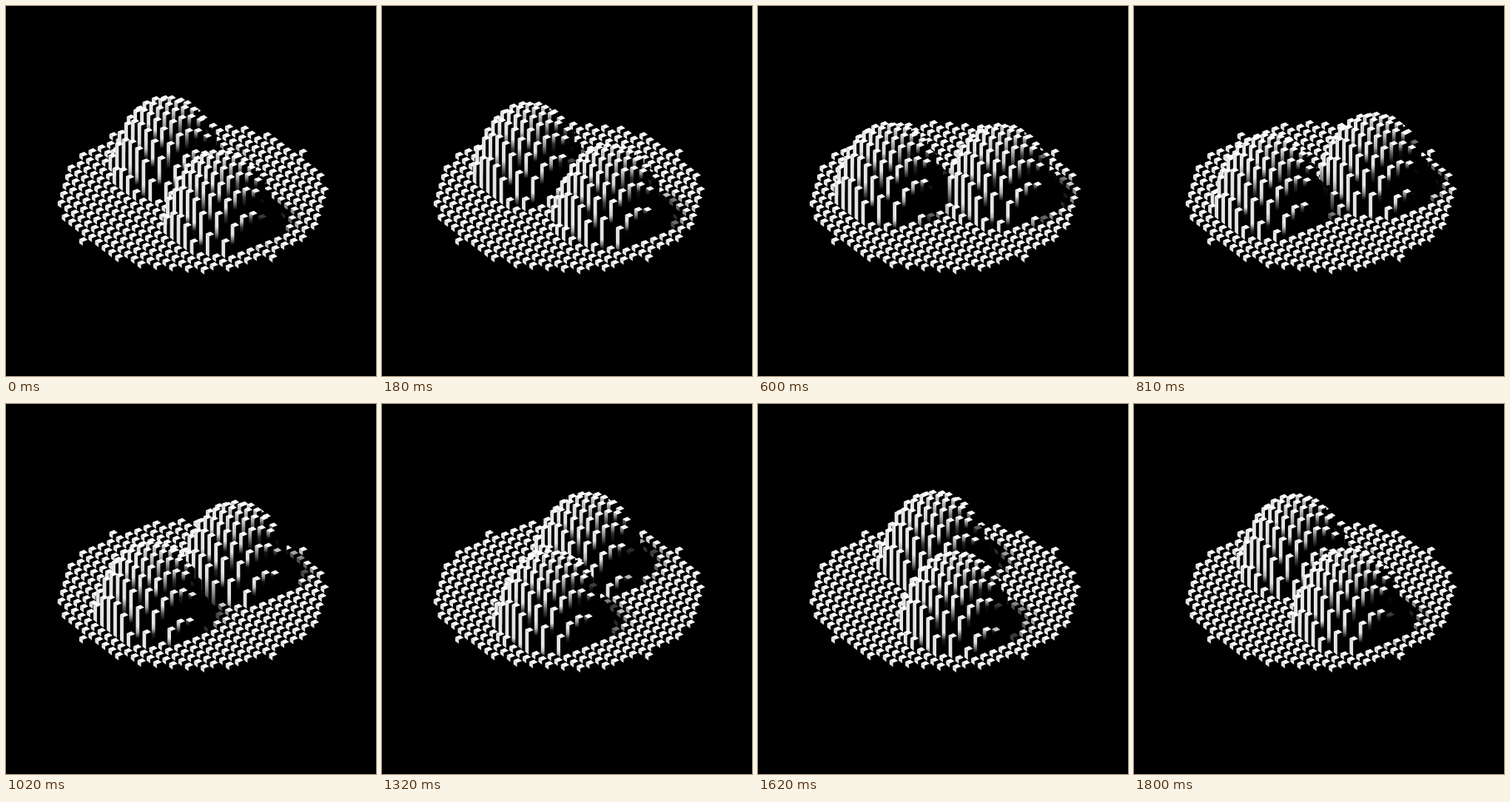
Recreate the animation shown at these times as an HTML page with a canvas. Size 500 by 500 pixels, loop 1.83 s.

```html
<!DOCTYPE html>
<html lang="en">
<head>
<meta charset="utf-8">
<title>Orbiting domes</title>
<style>
  html, body { margin: 0; width: 100%; height: 100%; overflow: hidden; background: #000; }
  canvas { display: block; width: 500px; height: 500px; }
</style>
</head>
<body>
<canvas id="stage" width="500" height="500"></canvas>
<script>
const ctx = document.getElementById('stage').getContext('2d');

// Grid units unless noted otherwise
const UNIT = 15.3, TILT = 0.554, RISE = 0.83;  // px per unit, ground and height foreshortening
const CX = 253.2, CY = 255.7;                  // centre of the disc, px
const TURN = Math.PI / 5, COS = Math.cos(TURN), SIN = Math.sin(TURN);
const RADIUS = 12, SIZE = 0.53, BASE = 5.5;    // BASE in px
const ORBIT = 4.9, DOME = 5.1, PEAK = 6.65;
const LIGHT = 1.7, LIGHT_X = 0.966, LIGHT_Y = -0.259;  // slope and ground direction of the light

const clamp = v => Math.max(0, Math.min(1, v));
const turn = (i, j) => [i * COS + j * SIN, j * COS - i * SIN];
const corner = (i, j) => {
  const [x, y] = turn(i * SIZE / 2, j * SIZE / 2);
  return [x * UNIT, y * UNIT * TILT];
};
const back = corner(1, -1), left = corner(-1, -1), front = corner(-1, 1), right = corner(1, 1);

let bumpX, bumpY;

function height(x, y) {
  const r = Math.min(Math.hypot(x - bumpX, y - bumpY), Math.hypot(x + bumpX, y + bumpY));
  return r < DOME ? PEAK * (1 - (r / DOME) ** 3) : 0;
}

// Smallest clearance of the light ray over the ground; negative means shadow
function clearance(x, y, z) {
  let m = LIGHT;
  for (let s = 0.8; s < 6; s += 0.4)
    m = Math.min(m, LIGHT + (z - height(x - s * LIGHT_X, y - s * LIGHT_Y)) / s);
  return m;
}

const grey = v => {
  const c = Math.round(255 * clamp(v));
  return `rgb(${c},${c},${c})`;
};

function fill(points, style) {
  ctx.fillStyle = style;
  ctx.beginPath();
  for (const [x, y] of points) ctx.lineTo(x, y);
  ctx.fill();
}

function column(i, j) {
  const [x, y] = turn(i, j);
  const z = height(x, y), px = CX + x * UNIT, ground = CY + y * UNIT * TILT;
  const lift = z * UNIT * RISE, drop = lift + BASE;
  const at = ([dx, dy], down = 0) => [px + dx, ground - lift + dy + down];

  fill([at(front), at(right), at(right, drop), at(front, drop)], '#000');

  const top = at(left)[1];
  const side = ctx.createLinearGradient(0, top, 0, top + drop + 4);
  const stops = z > 0 ? 6 : 1;
  for (let k = 0; k <= stops; k++) {
    const p = k / stops;
    side.addColorStop(p, grey(0.9 * clamp((clearance(x, y, z * (1 - p)) + 0.2) / 0.9)));
  }
  fill([at(left), at(front), at(front, drop), at(left, drop)], side);
  fill([at(back), at(right), at(front), at(left)], grey(clearance(x, y, z) / 0.2));
}

function draw(now) {
  const step = Math.floor(now % 1830 / 30);
  const angle = Math.PI * (118.5 / 180 + step / 60);
  bumpX = ORBIT * Math.cos(angle);
  bumpY = -ORBIT * Math.sin(angle);

  ctx.fillStyle = '#000';
  ctx.fillRect(0, 0, 500, 500);
  for (let i = RADIUS; i >= -RADIUS; i--)
    for (let j = -RADIUS; j <= RADIUS; j++)
      if (i * i + j * j <= RADIUS * RADIUS) column(i, j);
}

const start = performance.now();
function loop() {
  draw(performance.now() - start);
  requestAnimationFrame(loop);
}
loop();
</script>
</body>
</html>
```
